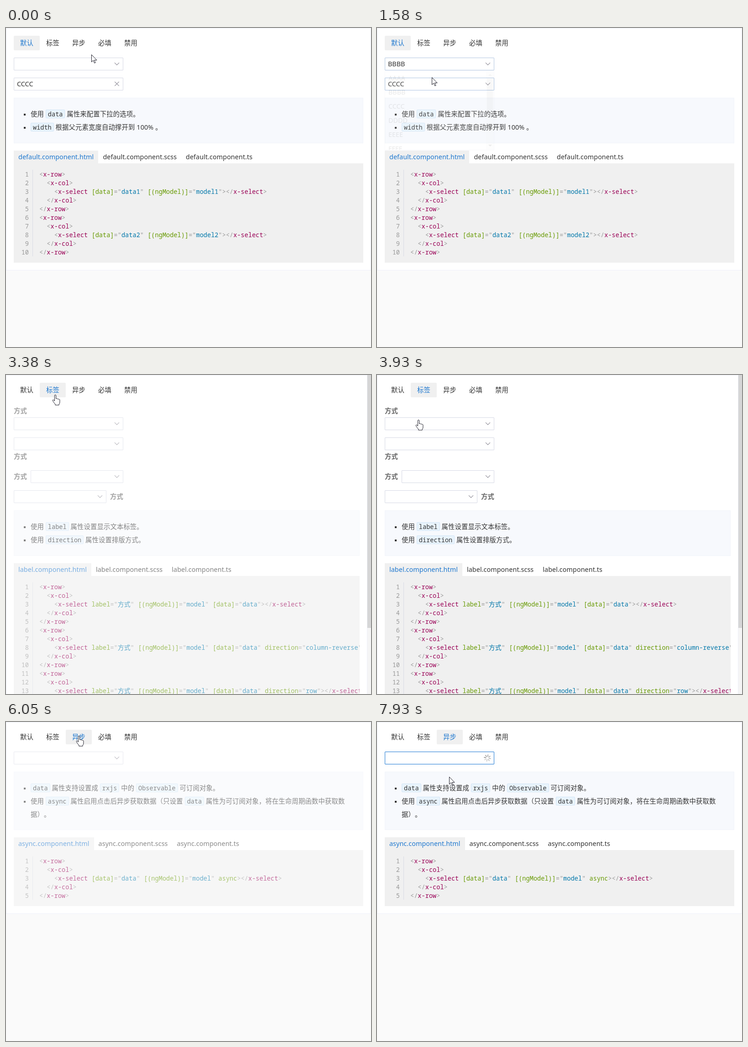
Write an HTML page that moves like this. It is 800 px wide and 700 px high and loops after 8 s.

```html
<!DOCTYPE html>
<html lang="zh-CN">
<head>
<meta charset="utf-8">
<title>Select</title>
<style>
html, body { margin: 0; width: 100%; height: 100%; overflow: hidden; background: #fafafa; }
body {
  position: relative; color: #333; white-space: pre; text-spacing-trim: space-all;
  font: 14.4px/28px "Noto Sans", "Noto Sans CJK SC", "Noto Sans CJK", sans-serif;
}
div, svg { position: absolute; box-sizing: border-box; }
svg { overflow: visible; fill: none; }
.card { left: 0; top: 0; background: #fff; border: 1px solid #eef0f9; }
.page { left: 0; top: 0; width: 800px; height: 700px; overflow: hidden; }
.tab { top: 17px; width: 57px; height: 32px; line-height: 32px; text-align: center; border-radius: 2px; }
.on { background: #f0f0f0; color: #1f78cf; }
.label { font-weight: 700; color: #666; }
.select { height: 28px; line-height: 26px; padding-left: 6px; background: #fff; border: 1px solid; border-radius: 1px; }
.icon { right: 8px; top: 7px; width: 10px; height: 10px; stroke: #918f9a; stroke-width: 1.2; }
.spin { left: 224px; top: 13px; width: 1px; height: 1px; stroke-width: 2; stroke-linecap: round; }
.info { left: 17px; background: #f7f9fd; border: 1px solid #f1f4fa; }
.line { left: 36px; line-height: 29px; letter-spacing: .1px; }
.dot { left: 21px; width: 4px; height: 4px; background: #333; }
code {
  display: inline-block; padding: 0 4px; letter-spacing: 0; background: #e8f3fc;
  border: 1px solid #d3e6f6; border-radius: 2px; font: 13.6px/17px "Noto Sans Mono", monospace;
}
.strip { left: 17px; display: flex; letter-spacing: .04px; }
.file { position: static; height: 28px; padding: 0 10px; }
.code {
  left: 17px; background: #f0f0f0; color: #999; overflow: hidden; letter-spacing: .02px;
  font: 13.6px/19px "Noto Sans Mono", "Noto Sans CJK SC", "Noto Sans CJK", monospace;
}
.nums { top: 14px; width: 33px; text-align: right; }
.src { top: 14px; left: 41px; padding-left: 14px; border-left: 1px solid #d9dbe4; }
.tag { color: #905; } .attr { color: #690; } .val { color: #07a; } .zh { font-size: 14px; }
.menu {
  width: 240px; height: 175px; background: #fff; overflow: hidden;
  border: 1px solid #d5d8e4; box-shadow: 0 1px 3px rgba(0, 0, 0, .15);
}
.list { left: 7px; top: 0; line-height: 31px; }
.rail { right: 0; top: 0; width: 17px; height: 173px; background: #f1f1f1; }
.thumb { left: 2px; top: 17px; width: 13px; height: 78px; background: #c1c1c1; }
.scroll { right: 0; top: 0; width: 8px; height: 700px; background: #f5f5f5; }
.scroll div { width: 8px; height: 555px; background: #d6d6d6; }
.cursor { left: 0; top: 0; width: 20px; height: 25px; fill: #fff; stroke: #1c1c28; stroke-linejoin: round; }
</style>
</head>
<body>
<script>
const LOOP = 8000;
const BLUE = '#1976d2', GREY = '#d5d8e4';

// Moments of the clicks
const OPEN_1 = 400, PICK_1 = 1410, CLEAR = 2430, GO_LABEL = 3200;
const OPEN_2 = 4180, PICK_2 = 4930, GO_ASYNC = 5880, LOAD = 7150;

// Where the pointer comes to rest
const stops = [
  { at: 0, x: 187, y: 58 },
  { at: 390, x: 150, y: 80 },
  { at: 1380, x: 126, y: 140 },
  { at: 1580, x: 120, y: 108 },
  { at: 2200, x: 246, y: 124 },
  { at: 2750, x: 108, y: 43 },
  { at: 3930, x: 91, y: 98 },
  { at: 4480, x: 116, y: 202 },
  { at: 4790, x: 115, y: 160 },
  { at: 5170, x: 115, y: 169 },
  { at: 5640, x: 160, y: 30 },
  { at: 6430, x: 186, y: 101 },
  { at: 7070, x: 150, y: 80 },
  { at: 7530, x: 146, y: 127 },
  { at: 7930, x: 158, y: 120 }
];

const row = attrs =>
  ['<x-row>', '  <x-col>', `    <x-select ${attrs}></x-select>`, '  </x-col>', '</x-row>'];
const after = (time, text) => t => t >= time ? text : '';

const pages = [
  {
    name: 'default', from: 0, right: 783,
    selects: [
      { x: 17, y: 65, w: 240, text: after(PICK_1, 'BBBB'), open: [OPEN_1, PICK_1], glow: [200, PICK_1] },
      { x: 17, y: 109, w: 240, text: t => t < CLEAR ? 'CCCC' : '', open: [CLEAR, GO_LABEL],
        glow: [1430, LOOP], cross: t => Math.max(1 - ramp(t, 70, 150), ramp(t, 1590, 150)) }
    ],
    lines: ['使用 `data` 属性来配置下拉的选项。', '`width` 根据父元素宽度自动撑开到 100% 。'],
    code: [1, 2].flatMap(n => row(`[data]="data${n}" [(ngModel)]="model${n}"`))
  },
  {
    name: 'label', from: GO_LABEL, right: 775,
    labels: [[17, 79], [17, 179], [17, 223], [228, 267]],
    selects: [
      { x: 17, y: 93, w: 240, open: [OPEN_2, PICK_2], glow: [3930, PICK_2] },
      { x: 17, y: 137, w: 240, glow: [4960, 5200] },
      { x: 54, y: 209, w: 203 },
      { x: 17, y: 253, w: 203 }
    ].map(s => ({ ...s, text: after(PICK_2, 'BBBB') })),
    lines: ['使用 `label` 属性设置显示文本标签。', '使用 `direction` 属性设置排版方式。'],
    code: ['', 'column-reverse', 'row', 'row-reverse']
      .flatMap(d => row('label="方式" [(ngModel)]="model" [data]="data"' + (d && ` direction="${d}"`)))
  },
  {
    name: 'async', from: GO_ASYNC, right: 783,
    selects: [{ x: 17, y: 65, w: 240, text: () => '', glow: [6950, LOOP], busy: LOAD }],
    lines: [
      '`data` 属性支持设置成 `rxjs` 中的 `Observable` 可订阅对象。',
      '使用 `async` 属性启用点击后异步获取数据（只设置 `data` 属性为可订阅对象，将在生命周期函数中获取数',
      '据）。'
    ],
    code: row('[data]="data" [(ngModel)]="model" async')
  }
];

const clamp = v => Math.max(0, Math.min(1, v));
const ramp = (t, start, span) => clamp((t - start) / span);
const pulse = (t, [a, b], span) => Math.max(0, ramp(Math.min(t, b), a, span) - ramp(t, b, span));
const within = (t, [a, b]) => t >= a && t < b;

function add(parent, cls, box = {}, html = '') {
  const el = document.createElement('div');
  el.className = cls;
  for (const key in box) el.style[key] = box[key] + 'px';
  el.innerHTML = html;
  parent.append(el);
  return el;
}

const span = (cls, text) => `<span class="${cls}">${text}</span>`;
const paint = src => src.replace(
  /(<\/?)([\w-]+)|([\w\[\]()]+)(?:="([^"]*)")?|>/g,
  (all, open, tag, attr, val) => {
    if (tag) return open.replace('<', '&lt;') + span('tag', tag);
    if (!attr) return '&gt;';
    if (val === undefined) return span('attr', attr);
    const text = val.replace(/[一-龥]+/g, zh => span('zh', zh));
    return span('attr', attr) + '="' + span('val', text) + '"';
  });

const spokes = Array.from({ length: 8 }, (_, i) =>
  `<path d="M0-3.6V-7" transform="rotate(${i * 45})" stroke="hsl(0 0% ${62 + i * 3}%)"/>`).join('');

function buildSelect(parent, s) {
  s.el = add(parent, 'select', { left: s.x, top: s.y, width: s.w },
    '<span></span>' +
    '<svg class="icon"><path d="M0 3.2l5 5 5-5"/></svg>' +
    '<svg class="icon"><path d="M.3 .8l9.4 9.4M9.7 .8L.3 10.2"/></svg>' +
    `<svg class="spin"><g>${spokes}</g></svg>`);
  [s.value, s.arrow, s.x_icon, s.spinner] = s.el.children;
}

function buildMenu(parent, s) {
  s.menu = add(parent, 'menu', { left: s.x, top: s.y + 28 });
  add(s.menu, 'list', {}, [...'ABCDEF'].map(c => c.repeat(4)).join('\n'));
  const rail = add(s.menu, 'rail', {},
    '<svg width="17" height="173"><path fill="#a3a3a3" d="M5 11h8l-4-4z"/>' +
    '<path fill="#505050" d="M5 162h8l-4 4z"/></svg>');
  add(rail, 'thumb');
}

function buildPage(p) {
  const el = p.el = add(document.body, 'page');
  const width = p.right - 17;
  (p.labels || []).forEach(([x, y]) => add(el, 'label', { left: x, top: y - 14 }, '方式'));
  p.selects.forEach(s => buildSelect(el, s));

  const top = p.selects.at(-1).y + 44;
  const height = Math.floor(42.4 + p.lines.length * 28.8);
  const info = add(el, 'info', { top, width, height });
  p.lines.forEach((line, i) => {
    const y = 19.5 + i * 29;
    add(info, 'line', { top: y }, line.replace(/`(\w+)`/g, '<code>$1</code>'));
    if (i < 2) add(info, 'dot', { top: y + 14 });
  });

  const filesTop = top + height + 16;
  const strip = add(el, 'strip', { top: filesTop });
  ['html', 'scss', 'ts'].forEach((ext, i) =>
    add(strip, i ? 'file' : 'file on', {}, `${p.name}.component.${ext}`));

  const codeHeight = p.code.length * 19 + 28;
  const code = add(el, 'code', { top: filesTop + 28, width, height: codeHeight });
  add(code, 'nums', {}, p.code.map((_, i) => i + 1).join('\n'));
  add(code, 'src', {}, p.code.map(paint).join('\n'));
  p.bottom = filesTop + codeHeight + 45;
  p.selects.filter(s => s.open).forEach(s => buildMenu(el, s));
}

const card = add(document.body, 'card');
const tabs = ['默认', '标签', '异步', '必填', '禁用']
  .map((text, i) => add(document.body, 'tab', { left: 17 + i * 57 }, text));
pages.forEach(buildPage);
const scroll = add(document.body, 'scroll', {}, '<div></div>');
document.body.insertAdjacentHTML('beforeend',
  '<svg class="cursor"><path d="M.5 .5V16.5L4.2 13l2.6 6 2.4-1-2.6-5.5H12z"/></svg>' +
  '<svg class="cursor"><path d="M-1.6 14V2.2a1.6 1.6 0 0 1 3.2 0V9q1.6-1.5 3 .6 1.6-1 2.7.6 2-.8 2.6 1.3V17' +
  'q0 2.5-1.8 4V23H-.1V21Q-3.6 17-5.6 13.6q-.8-2 1-2.2 1.5.2 3 2.6z"/></svg>');
const [arrow, hand] = document.querySelectorAll('.cursor');

// Longer moves take more time; each one ends at its stop's moment
function pointer(t) {
  let { x, y } = stops[0];
  for (const stop of stops.slice(1)) {
    const dx = stop.x - x, dy = stop.y - y;
    const span = 150 + 1.2 * Math.hypot(dx, dy);
    const u = ramp(t, stop.at - span, span), e = u * u * (3 - 2 * u);
    x += dx * e;
    y += dy * e;
    if (u < 1) break;
  }
  return [Math.round(x), Math.round(y)];
}

function clickable(page, t, x, y) {
  const inside = (left, top, w, h) => x >= left && x < left + w && y >= top && y < top + h;
  return inside(17, 17, 57 * tabs.length, 32) || page.selects.some(s =>
    inside(s.x, s.y, s.w, s.open && within(t, s.open) ? 203 : 28));
}

function drawSelect(s, t) {
  const busy = t >= s.busy;
  const focused = busy || s.open && within(t, s.open);
  const glow = focused ? 1 : s.glow ? pulse(t, s.glow, 300) ** 2 : 0;
  const cross = s.cross && s.text(t) ? s.cross(t) : 0;
  s.el.style.borderColor = `color-mix(in srgb, ${BLUE} ${glow * 100}%, ${GREY})`;
  s.value.textContent = s.text(t);
  s.x_icon.style.opacity = cross;
  s.arrow.style.opacity = busy ? 0 : 1 - cross;
  s.spinner.style.opacity = busy ? 1 : 0;
  if (busy) s.spinner.firstChild.setAttribute('transform', `rotate(${(t - s.busy) * .36})`);
  if (s.menu) s.menu.style.opacity = pulse(t, s.open, 190);
}

function draw(t) {
  const now = pages.findLastIndex(p => t >= p.from);
  const page = pages[now];
  card.style.width = page.right + 17 + 'px';
  card.style.height = page.bottom + 'px';
  scroll.style.display = page.bottom > 700 ? '' : 'none';
  tabs.forEach((tab, i) => tab.classList.toggle('on', i === now));
  pages.forEach(p => p.el.style.display = p === page ? '' : 'none');
  page.el.style.opacity = now ? ramp(t, page.from, 300) : 1;
  page.selects.forEach(s => drawSelect(s, t));

  const [x, y] = pointer(t);
  const over = clickable(page, t, x, y);
  arrow.style.display = over ? 'none' : '';
  hand.style.display = over ? '' : 'none';
  arrow.style.transform = hand.style.transform = `translate(${x}px, ${y}px)`;
}

const start = performance.now();
function tick() {
  draw((performance.now() - start) % LOOP);
  requestAnimationFrame(tick);
}
tick();
</script>
</body>
</html>
```
